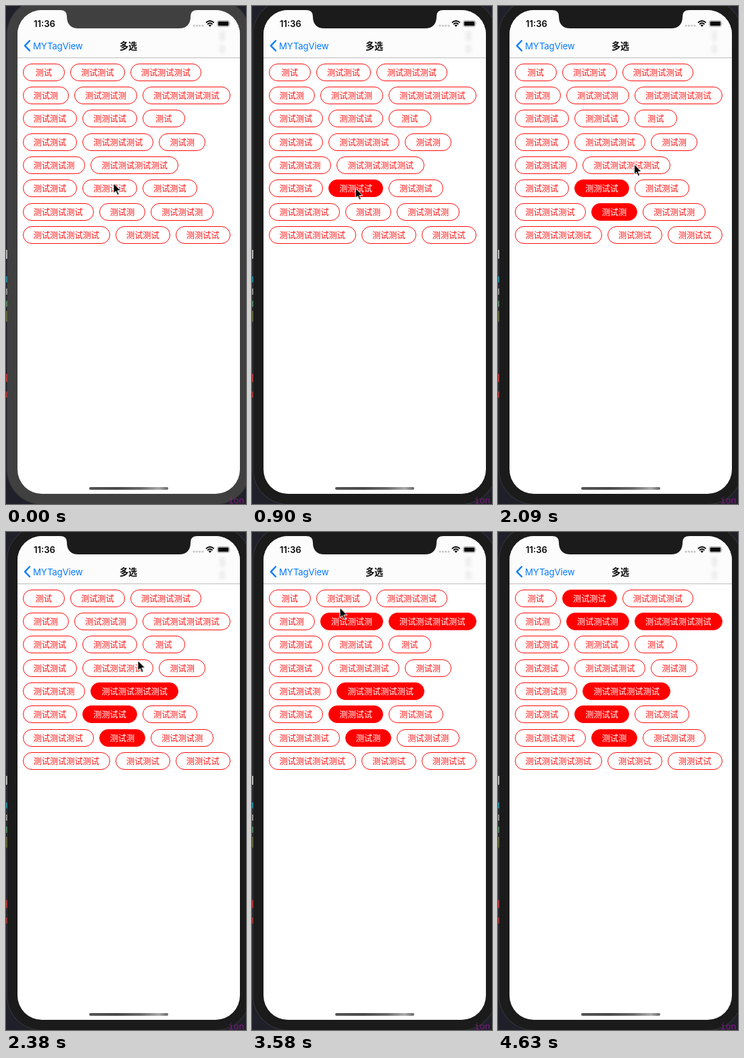
Write an HTML page that moves like this. It is 355 px wide and 735 px high and loops after 5220 ms.

```html
<!DOCTYPE html>
<html lang="zh-CN">
<head>
<meta charset="utf-8">
<title>多选</title>
<style>
  :root { --loop: 5220ms step-end infinite; --red: #ff1010; --blue: #087cfb; }
  html, body { margin: 0; width: 100%; height: 100%; overflow: hidden; }
  body { position: relative; background: #20202a; }
  body *, .tags { box-sizing: border-box; }
  .abs, .phone, .screen, .nav, .tags, .cursor, .bit { position: absolute; }

  /* Editor window showing past the phone's edge */
  .bit { left: 0; width: 2px; height: 9px; opacity: .75; }
  .code { left: 329px; top: 722px; font: 13px/14px "Noto Sans Mono", "DejaVu Sans Mono", monospace; color: #a0189c; opacity: .75; }

  .phone {
    left: 2px; top: -9px; width: 359px; height: 744px; border-radius: 51px;
    color: #404040; background: currentColor; box-shadow: 0 0 0 1px #34343a;
    animation: focus var(--loop);
  }
  .screen { left: 15px; top: 15px; width: 329px; height: 714px; border-radius: 36px; background: #fff; overflow: hidden; }
  .nav { left: 0; top: 0; width: 100%; height: 71px; background: #fcfcfc; border-bottom: 1px solid #bcbcbc; }
  .smudge { left: 299px; width: 8px; border-radius: 4px; background: #ededed; filter: blur(2px); }
  .overlay { left: 0; top: 0; width: 355px; height: 735px; }
  .notch { color: #404040; animation: focus var(--loop); }

  .label { white-space: nowrap; line-height: 20px; font-family: Inter, "Noto Sans", sans-serif; }
  .time { left: 41px; top: 16px; font-size: 13px; font-weight: 600; color: #080808; }
  .back { left: 40px; top: 49px; font-size: 13.3px; letter-spacing: -.2px; color: var(--blue); }
  .title { left: 168px; top: 49px; font: 600 13.1px/20px "Noto Sans CJK SC", "Noto Sans CJK", sans-serif; color: #080808; }
  .home { left: 123px; top: 710px; width: 117px; height: 4px; border-radius: 2px; background: linear-gradient(90deg, #555, #484848 35%, #686868 65%, #aaa 88%, #666); }

  .tags { left: 24.5px; top: 84.5px; font: 12.2px/24px "Noto Sans CJK SC", "Noto Sans CJK", sans-serif; }
  .tags div { display: flex; gap: 8px; height: 34.4px; }
  .tags span {
    min-width: 62.5px; height: 26px; padding: 0 15px; flex: none;
    border: 1px solid var(--red); border-radius: 13px;
    color: var(--red); text-align: center; white-space: nowrap;
  }

  .p1 { animation: pick1 var(--loop); }
  .p2 { animation: pick2 var(--loop); }
  .p3 { animation: pick3 var(--loop); }
  .p4 { animation: pick4 var(--loop); }
  .p5 { animation: pick5 var(--loop); }
  .p6 { animation: pick6 var(--loop); }
  @keyframes focus { 17.24%, to { color: #1b1b1b; } }
  @keyframes pick1 { 17.24%, to { color: #fff; background: #f00; } }
  @keyframes pick2 { 28.54%, to { color: #fff; background: #f00; } }
  @keyframes pick3 { 42.91%, to { color: #fff; background: #f00; } }
  @keyframes pick4 { 57.08%, to { color: #fff; background: #f00; } }
  @keyframes pick5 { 65.7%, to { color: #fff; background: #f00; } }
  @keyframes pick6 { 74.32%, to { color: #fff; background: #f00; } }

  .cursor { left: 0; top: 0; width: 13px; height: 20px; overflow: visible; animation: move var(--loop); }
  @keyframes move {
    0% { transform: translate(158.5px, 261px); }
    2.87% { transform: translate(157.5px, 261px); }
    11.49% { transform: translate(152.5px, 268px); }
    19.92% { transform: translate(158px, 285px); }
    22.79% { transform: translate(168px, 305px); }
    31.41% { transform: translate(213.5px, 252px); }
    37.16% { transform: translate(207px, 241px); }
    40.03% { transform: translate(201px, 233px); }
    45.59% { transform: translate(194.5px, 189px); }
    48.46% { transform: translate(205px, 172px); }
    51.34% { transform: translate(236px, 146px); }
    54.21% { transform: translate(259.5px, 128px); }
    59.96% { transform: translate(246px, 127px); }
    62.83% { transform: translate(175px, 127px); }
    65.7% { transform: translate(146px, 127px); }
    68.58% { transform: translate(129.5px, 111px); }
    71.45% { transform: translate(128px, 98px); }
    77.2% { transform: translate(196.5px, 229.5px); }
    80.07% { transform: translate(207px, 330px); }
    82.95% { transform: translate(236px, 520px); }
    85.82% { transform: translate(267px, 712px); visibility: visible; }
    88.69%, to { transform: translate(267px, 712px); visibility: hidden; }
  }
</style>
</head>
<body>
  <div class="phone">
    <div class="screen">
      <div class="nav"></div>
      <div class="abs smudge" style="top:30px;height:16px"></div>
      <div class="abs smudge" style="top:51px;height:13px"></div>
    </div>
  </div>

  <i class="bit" style="top:360px;height:13px;background:#ddd"></i>
  <i class="bit" style="top:399px;background:#1d9fb5"></i>
  <i class="bit" style="top:417px;background:#aaa"></i>
  <i class="bit" style="top:435px;background:#5a9a62"></i>
  <i class="bit" style="top:450px;height:16px;background:#70753d"></i>
  <i class="bit" style="top:543px;height:12px;background:#d83a36"></i>
  <i class="bit" style="top:569px;background:#c03430"></i>
  <div class="abs code">ion(</div>

  <svg class="abs overlay" viewBox="0 0 355 735">
    <path class="notch" fill="currentColor" d="M80 5V6Q90 6 90 15C90 27 96 33 107 33H256C267 33 273 27 273 15Q273 6 283 6V5Z"/>
    <g fill="#c4c4c4">
      <circle cx="278" cy="29" r="1.6"/><circle cx="282.3" cy="29" r="1.6"/>
      <circle cx="286.6" cy="29" r="1.6"/><circle cx="290.9" cy="29" r="1.6"/>
    </g>
    <g fill="none" stroke="#080808" stroke-width="1.9">
      <path d="M295.8 24.6Q301.7 19.2 307.6 24.6"/>
      <path d="M298 27Q301.7 23.7 305.4 27"/>
    </g>
    <path fill="#080808" d="M299.5 28.4Q301.7 26.6 303.9 28.4L301.7 30.7Z"/>
    <rect x="312.5" y="21.5" width="18" height="9" rx="2.4" fill="none" stroke="#aaa" stroke-width=".9"/>
    <rect x="313.7" y="22.7" width="15.6" height="6.6" rx="1.3" fill="#080808"/>
    <path d="M331.6 24.4Q333 26 331.6 27.6Z" fill="#aaa"/>
    <path d="M35 51.3L27.9 58.6L35 65.9" fill="none" stroke="#087cfb" stroke-width="2.3" stroke-linecap="round" stroke-linejoin="round"/>
  </svg>
  <div class="abs label time">11:36</div>
  <div class="abs label back">MYTagView</div>
  <div class="abs label title">多选</div>

  <div class="tags">
    <div><span>测试</span><span class="p6">测试测试</span><span>测试测试测试</span></div>
    <div><span>测试测</span><span class="p5">测试测试测</span><span class="p4">测试测试测试测试</span></div>
    <div><span>测试测试</span><span>测测试试</span><span>测试</span></div>
    <div><span>测试测试</span><span>测试测试测试</span><span>测试测</span></div>
    <div><span>测试测试测</span><span class="p3">测试测试测试测试</span></div>
    <div><span>测试测试</span><span class="p1">测测试试</span><span>测试测试</span></div>
    <div><span>测试测试测试</span><span class="p2">测试测</span><span>测试测试测</span></div>
    <div><span>测试测试测试测试</span><span>测试测试</span><span>测测试试</span></div>
  </div>

  <div class="abs home"></div>
  <svg class="cursor" viewBox="0 0 13 20">
    <path d="M.5 .8V15.6L3.9 12.4L6.3 18L8.8 17L6.4 11.5H11.2Z" fill="#000" stroke="#fff" stroke-width="1"/>
  </svg>
</body>
</html>
```
